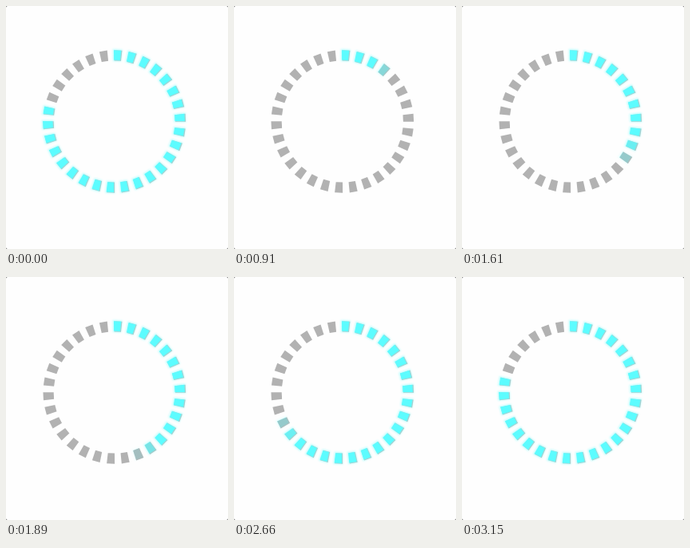
An HTML page that plays this animation: 278 px wide and 304 px high, repeating every 4900 ms.

```html
<!DOCTYPE html>
<html lang="en">
<head>
<meta charset="utf-8">
<title>Ring loader</title>
<style>
  html, body { margin: 0; width: 100%; height: 100%; overflow: hidden; background: #555; }
  svg { display: block; width: 278px; height: 304px; background: #fefefe; border-radius: 2px; }
  .idle { fill: #b2b2b2; }
  .core { fill: #5cfcff; }
  .glow { fill: #8ff; stroke: #8ff; stroke-width: 2; opacity: .55; filter: blur(.8px); }
</style>
</head>
<body>
<svg viewBox="0 0 278 304">
  <defs>
    <path id="block" d="M-5-6.6H5L4.2 6.6H-4.2Z"/>
  </defs>
  <g id="ring"></g>
</svg>
<script>
const CENTER = { x: 135.8, y: 144.5 };
const RADIUS = 82.6;
const BLOCKS = 30;
const LIT_BLOCKS = 24;
const STEP = 70;
const LOOP = 4900;
const FILL_START = 560;
const FILL_END = 3150;

const ring = document.getElementById('ring');

function add(parent, tag, attrs) {
  const el = document.createElementNS('http://www.w3.org/2000/svg', tag);
  for (const key in attrs) el.setAttribute(key, attrs[key]);
  parent.append(el);
  return el;
}

function place(index) {
  const angle = 3 + index * 360 / BLOCKS;
  return `translate(${CENTER.x} ${CENTER.y}) rotate(${angle}) translate(0 ${-RADIUS})`;
}

for (let i = 0; i < BLOCKS; i++) {
  add(ring, 'use', { href: '#block', class: 'idle', transform: place(i) });
}

// The lit layer sits slightly up and left, leaving a grey edge on the right.
const litLayer = add(ring, 'g', { transform: 'translate(-.8 -.4)' });
const lights = Array.from({ length: LIT_BLOCKS }, (_, i) => {
  const light = add(litLayer, 'g', { transform: place(i) });
  add(light, 'use', { href: '#block', class: 'glow' });
  add(light, 'use', { href: '#block', class: 'core', transform: 'scale(.93)' });
  return light;
});

// A new block begins every 1.5 steps and takes three steps to light up.
function draw(time) {
  const t = time % LOOP;
  const full = t < FILL_START || t >= FILL_END;
  const step = Math.floor((t - FILL_START) / STEP);
  lights.forEach((light, i) => {
    const level = (step - 1.5 * i + 1) / 3;
    light.style.opacity = full ? 1 : Math.max(0, Math.min(1, level));
  });
}

const start = performance.now();
function tick() {
  draw(performance.now() - start);
  requestAnimationFrame(tick);
}
tick();
</script>
</body>
</html>
```
